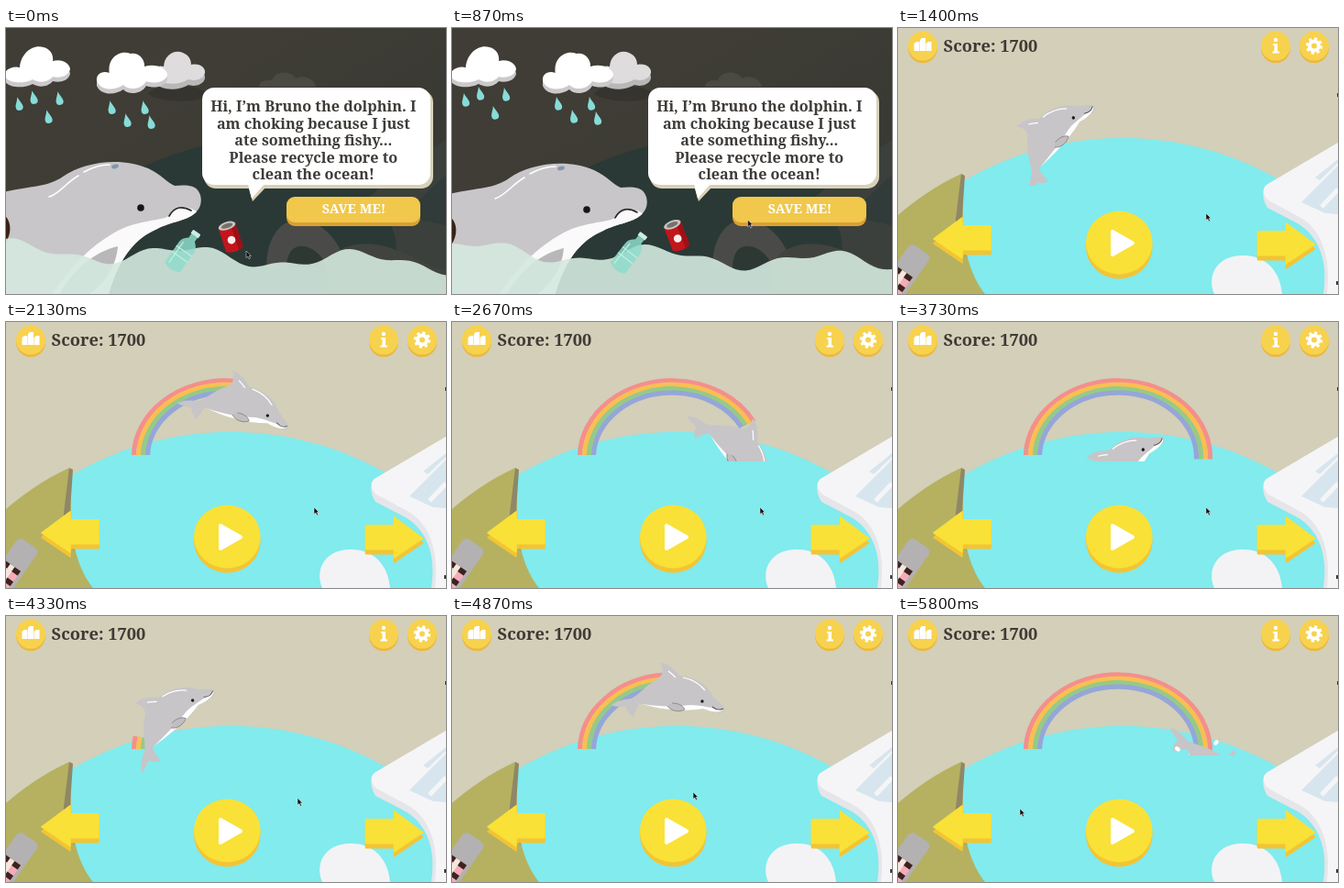
Write an HTML page that moves like this. It is 480x290 px and loops after 5870 ms.

```html
<!DOCTYPE html>
<html lang="en">
<head>
<meta charset="utf-8">
<title>Dolphin rescue</title>
<style>
  html, body { margin: 0; width: 100%; height: 100%; overflow: hidden; background: #d3cfb9; }
  svg { display: block; width: 480px; height: 290px; }
  text { font-family: "Noto Serif", serif; font-weight: 700; }
  .mid { text-anchor: middle; }
</style>
</head>
<body>
<svg viewBox="0 0 480 290">
  <defs>
    <clipPath id="surface"><rect id="cut" width="480" height="152"/></clipPath>
    <linearGradient id="night" x1="0" y1="0" x2="1" y2="1">
      <stop offset=".3" stop-color="#3f3d35"/><stop offset="1" stop-color="#343733"/>
    </linearGradient>
    <path id="drop" d="M0 -8 C1 -4 4 0 4 3 A4 4 0 0 1 -4 3 C-4 0 -1 -4 0 -8Z" fill="#86dcd8"/>
    <g id="disc">
      <circle cy="2.5" r="16" fill="#ecb83d"/><circle r="16" fill="#f7d24f"/>
    </g>
    <path id="arrow" d="M0 0 L31 -23 V-14 H62 V12 H31 V21Z" stroke-width="1.5" stroke-linejoin="round"/>
    <path id="cloudA" d="M-2 52 C-2 45 8 41 15 43 C16 28 29 17 41 21 C49 23 52 30 51 36 C61 33 70 39 70 45 C68 53 58 55 51 53 C44 61 34 59 29 56 C20 61 2 61 -2 52Z"/>
    <path id="cloudB" d="M161 51 C160 43 167 40 172 42 C173 29 184 23 193 27 C200 30 202 35 202 40 C212 38 218 44 217 49 C215 57 204 58 199 56 C188 63 167 63 161 51Z"/>
    <path id="cloudC" d="M99 58 C98 50 105 46 113 49 C110 34 123 23 136 28 C145 26 152 35 151 42 C163 38 176 44 176 51 C174 60 160 61 153 58 C147 68 133 68 128 62 C118 69 103 68 99 58Z"/>
  </defs>

  <g id="sea">
    <rect width="480" height="290" fill="url(#night)"/>
    <circle cx="295" cy="462" r="343" fill="#2a3936"/>
    <path d="M395 185 C420 165 450 140 480 122 V290 H400 C440 250 430 215 395 185Z" fill="#3b403c"/>
    <path d="M432 205 L480 160 V215Z" fill="#313b39"/>
    <path d="M155 72 C163 62 175 64 183 68 C195 60 214 64 221 74 C208 82 170 82 155 72Z" fill="#35342f"/>
    <path d="M276 64 C277 56 286 57 290 57 C294 46 312 46 316 55 C327 50 337 57 338 64Z" fill="#4a4942"/>
    <path d="M284 262 C284 222 306 204 328 210 C352 216 366 238 372 262Z" fill="#4a4b48"/>
    <path d="M306 262 C306 240 318 234 332 240 C342 245 348 254 350 262Z" fill="#2d3835"/>
    <path d="M350 262 C352 240 385 228 420 240 C450 250 462 262 480 264 V290 H350Z" fill="#41433f"/>

    <g id="rain"></g>
    <use href="#cloudA" y="5" fill="#cbc9ca"/><use href="#cloudA" fill="#fff"/>
    <use href="#cloudB" y="6" fill="#b9b7b8"/><use href="#cloudB" fill="#dedcdd"/>
    <use href="#cloudC" y="5" fill="#cbc9ca"/><use href="#cloudC" fill="#fff"/>

    <g id="big">
      <path d="M-8 180 C25 172 45 174 62 162 C85 146 125 140 155 153 C170 160 176 169 184 172 C195 171 206 171 210 178 C214 184 214 194 208 200 C200 210 180 211 165 219 C142 229 125 247 112 290 H-8 Z" fill="#c8c6c8"/>
      <path d="M208 200 C200 210 180 211 165 219 C142 229 125 247 112 290 H50 C70 262 88 240 122 221 C146 209 166 211 178 205 C187 192 198 194 208 200Z" fill="#fbfafa"/>
      <path d="M-2 204 C6 210 7 225 -2 236Z" fill="#3a2115"/>
      <path d="M178 205 C184 194 193 194 202 199" fill="none" stroke="#2c2a2a" stroke-width="1.7" stroke-linecap="round"/>
      <path d="M47 184 C58 181 65 169 79 161 M85 157 C96 151 107 149 113 149" fill="none" stroke="#fff" stroke-width="1.6" stroke-linecap="round"/>
      <ellipse cx="119" cy="151" rx="4" ry="2.2" fill="#7f98ad" transform="rotate(-15 119 151)"/>
      <circle cx="147" cy="196" r="3.8" fill="#171515"/>
      <path d="M122 238 C96 244 72 264 58 292 H88 C106 280 120 262 122 238Z" fill="#b9b7ba"/>
    </g>

    <path id="wave" fill="#d4e9df" opacity=".9"/>

    <g id="bottle"><g transform="rotate(35)">
      <path d="M-4 -20 H4 V-15 C10 -10 10 -8 10 -2 V22 Q0 27 -10 22 V-2 C-10 -8 -10 -10 -4 -15Z" fill="#8fdcca" opacity=".85"/>
      <rect x="-5" y="-25" width="10" height="5" rx="1" fill="#c8efe5"/>
      <path d="M-10 0 H10 M-10 8 H10 M-6 -8 V20" fill="none" stroke="#c4eee3" stroke-width="1.2"/>
    </g></g>
    <g id="can"><g transform="rotate(-18) scale(1.08)">
      <path d="M-9 -12 V13 Q0 18 9 13 V-12Z" fill="#c3151b"/>
      <path d="M4 -11 V15 Q7 14 9 13 V-12Z" fill="#9f1016"/>
      <ellipse cy="-12" rx="9" ry="4" fill="#c9c5c2"/><ellipse cy="-12" rx="6" ry="2.3" fill="#77716d"/>
      <circle cy="3" r="4" fill="#f7eeee"/>
    </g></g>

    <rect x="216" y="68" width="250" height="107" rx="13" fill="#d8d1b8"/>
    <path d="M264 172 L269 189 L285 172Z" fill="#d8d1b8"/>
    <path d="M264 170 L268 186 L282 170Z" fill="#fff"/>
    <rect x="214" y="65" width="249" height="106" rx="13" fill="#fff"/>
    <g id="speech" class="mid" font-size="16.2" fill="#3e3b38"></g>
    <rect x="306" y="187" width="146" height="29" rx="9" fill="#d9a033"/>
    <rect x="306" y="184" width="146" height="28" rx="9" fill="#f1c84b"/>
    <text class="mid" x="379.5" y="202" font-size="14.4" fill="#fff">SAVE ME!</text>
  </g>

  <g id="game">
    <rect width="480" height="290" fill="#d3cfb9"/>
    <circle cx="245" cy="462.8" r="343" fill="#81ebed"/>
    <g id="rainbow" fill="none"></g>
    <g clip-path="url(#surface)"><g id="dolphin">
      <path class="flex" fill="#c7c5c8" d="M56 14 C53 10 49 7 45 3 C40 -8 28 -18 8 -20 C4 -25 -2 -33 -13 -34 C-9 -28 -9 -21 -15 -17 C-27 -11 -34 -1 -44 5 C-51 6 -58 6 -66 12 C-60 15 -55 13 -50 14 C-49 18 -47 22 -42 25 C-40 19 -38 13 -35 10 C-20 15 10 19 35 16 C44 19 50 21 54 20 C57 19 58 16 56 14Z"/>
      <path class="flex" fill="#fff" d="M-33 11 C-15 14 5 14 20 12 C30 12 40 15 56 17 C54 20 46 21 34 16 C10 20 -15 16 -33 11Z"/>
      <path class="flex" fill="#c0bec1" stroke="#77757a" stroke-width=".7" d="M-5 13 C-1 19 8 20 14 17 C12 12 6 10 0 10"/>
      <path d="M12 -18 Q27 -15 36 -4 M-4 -25 Q1 -21 4 -18" fill="none" stroke="#fff" stroke-width="1.2"/>
      <path d="M44 14 Q50 19 56 16" fill="none" stroke="#555" stroke-width="1"/>
      <circle cx="33" cy="8" r="1.7" fill="#1c1a1c"/>
    </g></g>
    <g id="splash" fill="#fff"><ellipse/><ellipse/></g>

    <path d="M0 204 C18 188 43 171 69 159 L71 205 C70 240 80 272 95 290 H0Z" fill="#b5b161"/>
    <path d="M69 159 L73 161 L70 205 C69 222 71 236 75 250 C66 238 62 224 63 208Z" fill="#8f8767"/>
    <g transform="translate(7 269) rotate(35)">
      <rect x="-14" y="-33" width="27" height="66" rx="6" fill="#b3b1b2"/>
      <path d="M-14 -3 H9 V33 H-14Z" fill="#f6abb8"/>
      <path d="M-14 -3 H9 V3 H-14Z M-14 11 H9 V17 H-14Z" fill="#3a2320"/>
      <path d="M-5 -3 H1 V30 H-5Z" fill="#f4e7dc"/>
    </g>

    <path d="M480 125 L402 171 C396 176 398 188 403 196 L432 211 C458 224 470 252 464 290 H480Z" fill="#e6e5ea"/>
    <path d="M480 125 L402 171 C397 175 398 182 404 188 L436 205 C462 218 473 250 468 290 H480Z" fill="#f5f5f7"/>
    <path d="M440 190 L480 150 V203 L466 202Z M455 163 L480 143 V147 L460 166Z" fill="#d7e5ee"/>
    <path d="M462 195 L480 176" stroke="#f5f5f7" stroke-width="5"/>
    <path d="M345 290 C336 268 350 248 375 248 C400 247 417 264 419 290Z" fill="#f3f3f5"/>
    <path d="M479 71 h1 v4 h-1Z M478 276 h2 v4 h-2Z" fill="#3b3a36"/>

    <g transform="translate(39 229.8)"><use href="#arrow" y="5" fill="#f3c434" stroke="#f3c434"/><use href="#arrow" fill="#f9e138" stroke="#f9e138"/></g>
    <g transform="translate(454.5 235.8) scale(-1 1)"><use href="#arrow" y="5" fill="#f3c434" stroke="#f3c434"/><use href="#arrow" fill="#f9e138" stroke="#f9e138"/></g>
    <ellipse cx="241.3" cy="238.5" rx="36.3" ry="35" fill="#f3c434"/>
    <ellipse cx="241.3" cy="234" rx="36.3" ry="34.5" fill="#f9e138"/>
    <path d="M234 222 L256 234.5 L234 247Z" fill="#fff" stroke="#fff" stroke-width="4" stroke-linejoin="round"/>

    <use href="#disc" x="27" y="19.6"/><use href="#disc" x="412" y="19.6"/><use href="#disc" x="454" y="19.6"/>
    <path d="M17.500 17 L20 15 H23.500 V25 H17.500Z M24 13 L26 11 H30 V25 H24Z M30.500 17 L33 15 H36.500 V25 H30.500Z" fill="#fff"/>
    <path d="M409 17 H414 V25.500 H416 V27.500 H408.500 V25.500 H410.500 V19 H409Z" fill="#fff"/>
    <circle cx="412" cy="13" r="2.2" fill="#fff"/>
    <circle cx="454" cy="19.5" r="7.5" fill="none" stroke="#fff" stroke-width="3.4" stroke-dasharray="3 2.89"/>
    <circle cx="454" cy="19.5" r="5" fill="none" stroke="#fff" stroke-width="4"/>
    <text x="49.500" y="26" font-size="18.3" fill="#3e3a35">Score: 1700</text>
  </g>

  <path id="cursor" d="M0 0 V7.500 L1.800 6 L3.200 8.800 L4.500 8.200 L3.200 5.400 H5.400Z" fill="#111" stroke="#eee" stroke-width=".5"/>
</svg>

<script>
const LOOP = 5870, FPS = 15, CUT = 1330, SECOND_JUMP = 2849;
const $ = id => document.getElementById(id);
const clamp = (v, lo, hi) => Math.min(hi, Math.max(lo, v));
const ripple = (x, crest, len) => Math.cos((x - crest) / len * 2 * Math.PI);

function add(parent, tag, attrs, text = '') {
  const el = document.createElementNS('http://www.w3.org/2000/svg', tag);
  for (const k in attrs) el.setAttribute(k, attrs[k]);
  el.textContent = text;
  return parent.appendChild(el);
}
const place = (el, x, y, r = 0) => el.setAttribute('transform', `translate(${x} ${y}) rotate(${r})`);

// Smooth curve through rows of [time, ...values]
function track(rows, t) {
  const last = rows.length - 1;
  if (t <= rows[0][0]) return rows[0].slice(1);
  if (t >= rows[last][0]) return rows[last].slice(1);
  const i = rows.findIndex(r => r[0] > t) - 1;
  const a = rows[i], b = rows[i + 1], span = b[0] - a[0], u = (t - a[0]) / span;
  const slope = (j, k) => {
    const p = rows[Math.max(0, j - 1)], q = rows[Math.min(last, j + 1)];
    return (q[k] - p[k]) / (q[0] - p[0]) * span;
  };
  return a.slice(1).map((v, n) => {
    const k = n + 1, m = slope(i, k), w = slope(i + 1, k), d = b[k] - v;
    return v + u * (m + u * (3 * d - 2 * m - w + u * (m + w - 2 * d)));
  });
}

// time, x, y, turn, bend, rainbow %
const JUMP = [
  [1100, 128, 195, -60, .22, 0],
  [1400, 164, 118, -50, .22, 0],
  [2018, 240, 85, 0, 0, 46.5],
  [2133, 254, 89, 9, -.03, 53],
  [2951, 342, 172, 65, .1, 100],
  [3150, 352, 228, 75, .1, 100]
];
const POINTER = [
  [0, 262, 243], [300, 268, 239], [1000, 334, 203], [1200, 336, 202],
  [1400, 336, 202], [3800, 336, 202], [4100, 336, 202],
  [4867, 263, 192], [5800, 133, 210]
];
const DROPS = [[14, 83], [30, 76], [46, 97], [58, 77], [115, 87], [132, 101], [151, 87], [158, 103]];

['Hi, I’m Bruno the dolphin. I', 'am choking because I just', 'ate something fishy...',
 'Please recycle more to', 'clean the ocean!'].forEach((s, i) =>
  add($('speech'), 'text', { x: 335.3, y: 91 + i * 18.5 }, s));

const drops = DROPS.map(() => add($('rain'), 'use', { href: '#drop' }));
const bands = ['#f48f8c', '#f9bf52', '#95ca88', '#95a6d9'].map((stroke, i) => {
  const r = 100.5 - 5 * i;
  return add($('rainbow'), 'path', {
    d: `M${240 - r} 145 A${r} ${83.3 - 4.4 * i} 0 0 1 ${240 + r} 149.5`,
    stroke, 'stroke-width': 5.2, pathLength: 100
  });
});
const flex = [...document.querySelectorAll('.flex')].map(el => [el, el.getAttribute('d')]);

function bend(d, amount) {
  return d.replace(/(-?[\d.]+) (-?[\d.]+)/g, (_, x, y) => {
    const a = amount * Math.min(0, x) / 60, c = Math.cos(a), s = Math.sin(a);
    return `${(x * c - y * s).toFixed(2)} ${(x * s + y * c).toFixed(2)}`;
  });
}

function wave(s) {
  let d = 'M0 290';
  for (let x = 0; x <= 480; x += 5) {
    const y = 242 + .03 * x - 9 * ripple(x, 5 + s * 30, 190) - 4 * ripple(x, 7 - s * 20, 73);
    d += ` L${x} ${y.toFixed(1)}`;
  }
  return d + ' V290Z';
}

function drawSea(t) {
  const s = t / 1000, bob = Math.sin(s * 2.6);
  DROPS.forEach(([x, y], i) => {
    const fall = (y - 60 + s * 62) % 58;
    place(drops[i], x - (fall - (y - 60)) * .12, 60 + fall, -12);
    drops[i].setAttribute('opacity', clamp((58 - fall) / 10, 0, 1));
  });
  place($('big'), 0, bob * 2.5);
  place($('bottle'), 194, 243 + bob * 2, bob * 4);
  place($('can'), 245, 228 - bob * 2, -bob * 4);
  $('wave').setAttribute('d', wave(s));
}

function drawSplash(phase) {
  const u = (phase - 2951) / 249, on = u > -.25 && u < 1.3;
  $('splash').style.display = on ? '' : 'none';
  if (!on) return;
  const [left, right] = $('splash').children;
  const rx = 3.2 + u * 1.4, ry = 2.2 - u * .9;
  for (const el of [left, right]) {
    el.setAttribute('rx', rx);
    el.setAttribute('ry', ry);
  }
  place(left, 305 + 16 * u, 145 + 2.5 * u, 35 - 15 * u);
  place(right, 347 - 8 * u, 138 + 9.5 * u, -55 + 35 * u);
}

function drawGame(t) {
  const second = t >= 4000, phase = second ? t - SECOND_JUMP : t;
  let [x, y, turn, curl, arc] = track(JUMP, phase);
  let level = phase < 1700 ? 172 : 152;
  if (!second && t > 3350) {
    // short peep from the middle of the pool
    [x, y, turn, curl] = [240, 215 - 58 * Math.sin((t - 3350) / 650 * Math.PI), -50, .22];
    level = 152;
  }
  place($('dolphin'), x, y, turn);
  flex.forEach(([el, d]) => el.setAttribute('d', bend(d, curl)));
  $('cut').setAttribute('height', level);
  arc = clamp(arc, 0, 100);
  bands.forEach(b => b.setAttribute('stroke-dasharray', `${arc} 200`));
  $('rainbow').setAttribute('opacity', second ? +(arc > 0) : clamp((4000 - t) / 200, 0, 1));
  drawSplash(phase);
}

function draw(now) {
  const t = Math.floor((now % LOOP) / 1000 * FPS + .08) * 1000 / FPS;
  const atSea = t < CUT;
  $('sea').style.display = atSea ? '' : 'none';
  $('game').style.display = atSea ? 'none' : '';
  (atSea ? drawSea : drawGame)(t);
  place($('cursor'), ...track(POINTER, t));
}

let start;
function tick(now) {
  start ??= now;
  draw(now - start);
  requestAnimationFrame(tick);
}
draw(0);
requestAnimationFrame(tick);
</script>
</body>
</html>
```
